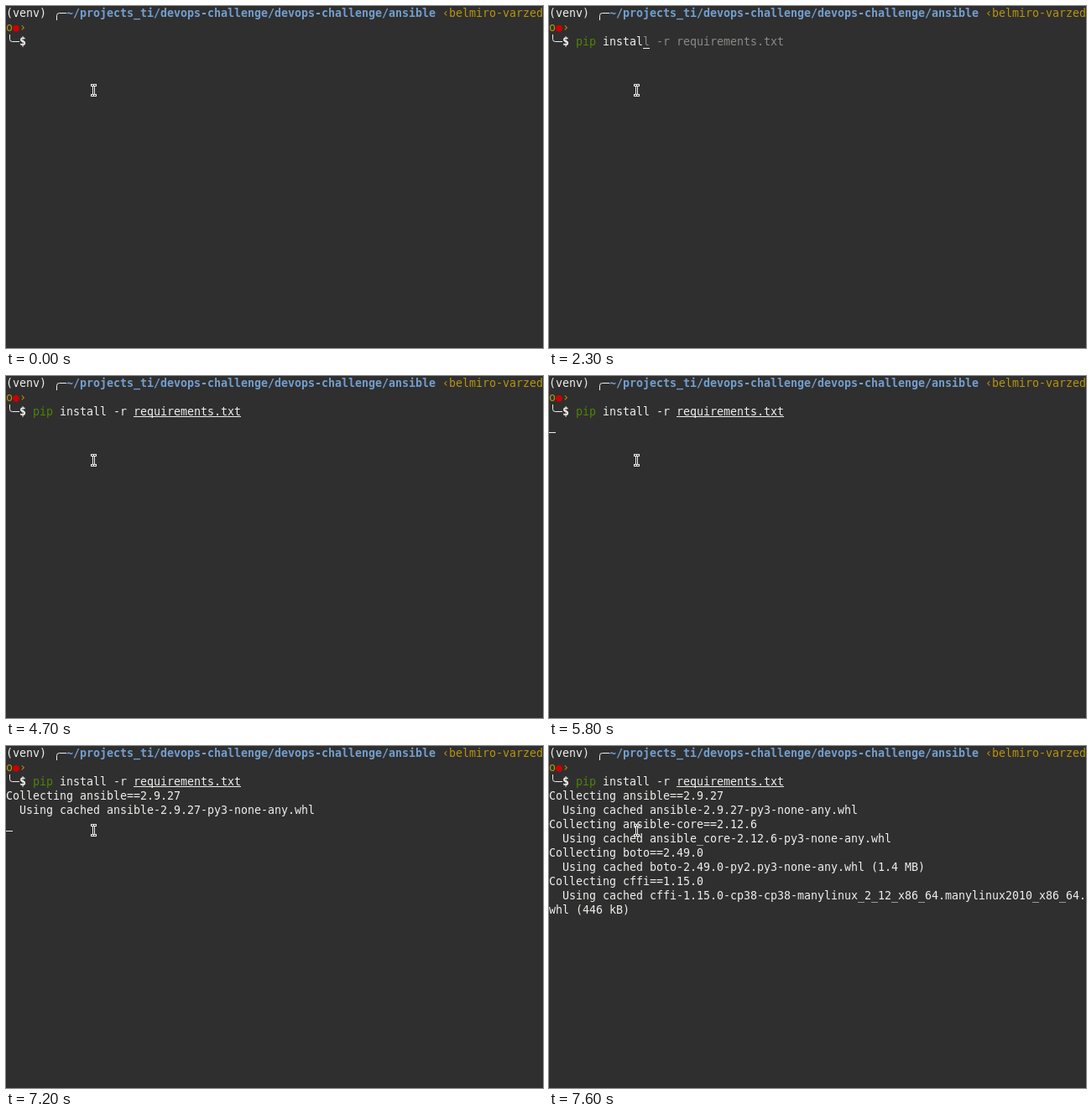
Recreate the animation shown at these times as an HTML page with a canvas. Size 640 by 408 pixels, loop 8000 ms.

```html
<!DOCTYPE html>
<html lang="en">
<head>
<meta charset="utf-8">
<title>Terminal: pip install</title>
<style>
  html, body { margin: 0; width: 100%; height: 100%; overflow: hidden; background: #2f2f2f; }
  canvas { display: block; }
</style>
</head>
<body>
<canvas id="screen" width="640" height="408"></canvas>
<script>
const ctx = document.getElementById('screen').getContext('2d');
const LOOP = 8000, CELL_W = 8, CELL_H = 17, BASELINE = 13, COLUMNS = 80, BLINK = 600;
const FONT = '13.333px "DejaVu Sans Mono", monospace';
const BACKGROUND = '#2f2f2f', WHITE = '#eeeeec', GREY = '#8a8a88', BLUE = '#729fcf',
      YELLOW = '#b8940c', GREEN = '#4e8406', RED = '#cc0000', BRIGHT_RED = '#ef2929';

const COMMAND = 'pip install -r requirements.txt';
const PROMPT_COLUMN = 4, PROMPT_ROW = 2;
const FILE_START = COMMAND.indexOf('requirements');
const KEY_TIMES = [500, 700, 800, 1400, 1600, 1800, 1900, 2100, 2200, 2300,
                   2500, 2700, 3000, 3300, 3500, 3800, 3900];
const COMPLETE = 4100, TRIM = 5600, ENTER = 5800;
// The first entry sets the blink phase at the start of the loop.
const CURSOR_RESETS = [-1000, ...KEY_TIMES, COMPLETE, TRIM, ENTER];

const OUTPUT = [
  [7200, 'Collecting ansible==2.9.27'],
  [7200, '  Using cached ansible-2.9.27-py3-none-any.whl'],
  [7300, 'Collecting ansible-core==2.12.6'],
  [7300, '  Using cached ansible_core-2.12.6-py3-none-any.whl'],
  [7400, 'Collecting boto==2.49.0'],
  [7400, '  Using cached boto-2.49.0-py2.py3-none-any.whl (1.4 MB)'],
  [7600, 'Collecting cffi==1.15.0'],
  [7600, '  Using cached cffi-1.15.0-cp38-cp38-manylinux_2_12_x86_64.manylinux2010_x86_64.whl (446 kB)'],
];

function write(text, column, row, color = WHITE, bold = false) {
  ctx.font = (bold ? 'bold ' : '') + FONT;
  ctx.fillStyle = color;
  [...text].forEach((char, i) =>
    ctx.fillText(char, (column + i) * CELL_W, row * CELL_H + BASELINE));
}

function underline(column, row, length, offset) {
  ctx.fillStyle = WHITE;
  ctx.fillRect(column * CELL_W, row * CELL_H + offset, length * CELL_W, 1);
}

// Rounded two-cell corner joining the prompt's two lines.
function corner(column, row, opensDown) {
  const x = column * CELL_W + 4.5, y = row * CELL_H + 8.5;
  const end = row * CELL_H + (opensDown ? CELL_H : 0);
  ctx.strokeStyle = WHITE;
  ctx.lineWidth = 1;
  ctx.beginPath();
  ctx.moveTo(x, end);
  ctx.arcTo(x, y, x + 4, y, 3);
  ctx.lineTo((column + 2) * CELL_W, y);
  ctx.stroke();
}

function drawPrompt() {
  write('(venv)', 0, 0);
  corner(7, 0, true);
  write('~/projects_ti/devops-challenge/devops-challenge/ansible', 9, 0, BLUE, true);
  write('‹belmiro-varzed', 65, 0, YELLOW);
  write('o', 0, 1, YELLOW);
  write('●', 1, 1, RED);
  write('›', 2, 1, YELLOW);
  corner(0, 2, false);
  write('$', 2, 2, WHITE, true);
}

function drawCommand(typed) {
  if (!typed) return;
  const program = COMMAND.slice(0, Math.min(typed, 3));
  const known = program === 'pip';
  write(program, PROMPT_COLUMN, PROMPT_ROW, known ? GREEN : BRIGHT_RED, !known);
  write(COMMAND.slice(3, Math.max(typed, 3)), PROMPT_COLUMN + 3, PROMPT_ROW);
  write(COMMAND.slice(typed), PROMPT_COLUMN + typed, PROMPT_ROW, GREY);
  if (typed > FILE_START)
    underline(PROMPT_COLUMN + FILE_START, PROMPT_ROW, typed - FILE_START, 14);
}

// Returns the first free row below the output.
function drawOutput(time) {
  let row = PROMPT_ROW + 1;
  for (const [start, line] of OUTPUT) {
    if (time < start) break;
    for (let i = 0; i < line.length; i += COLUMNS)
      write(line.slice(i, i + COLUMNS), 0, row++);
  }
  return row;
}

function drawCursor(time, typed, outputRow) {
  const lastReset = CURSOR_RESETS.filter(reset => reset <= time).pop();
  if (Math.floor((time - lastReset) / BLINK) % 2) return;
  if (time >= ENTER) return underline(0, outputRow, 1, 16);
  const trailingSpace = time >= COMPLETE && time < TRIM ? 1 : 0;
  underline(PROMPT_COLUMN + typed + trailingSpace, PROMPT_ROW, 1, 16);
}

function drawPointer() {
  for (const [color, grow] of [[WHITE, 1], ['#202020', 0]]) {
    ctx.fillStyle = color;
    const bar = (x, y, w, h) =>
      ctx.fillRect(x - grow, y - grow, w + 2 * grow, h + 2 * grow);
    for (const y of [94, 106]) {
      bar(102, y, 2, 1);
      bar(105, y, 2, 1);
    }
    bar(104, 96, 1, 9);
  }
}

function draw(time) {
  ctx.fillStyle = BACKGROUND;
  ctx.fillRect(0, 0, 640, 408);
  const typed = time >= COMPLETE ? COMMAND.length
    : KEY_TIMES.filter(key => key <= time).length;
  drawPrompt();
  drawCommand(typed);
  const outputRow = drawOutput(time);
  drawCursor(time, typed, outputRow);
  drawPointer();
}

const start = performance.now();
function tick() {
  draw((performance.now() - start) % LOOP);
  requestAnimationFrame(tick);
}
tick();
</script>
</body>
</html>
```
